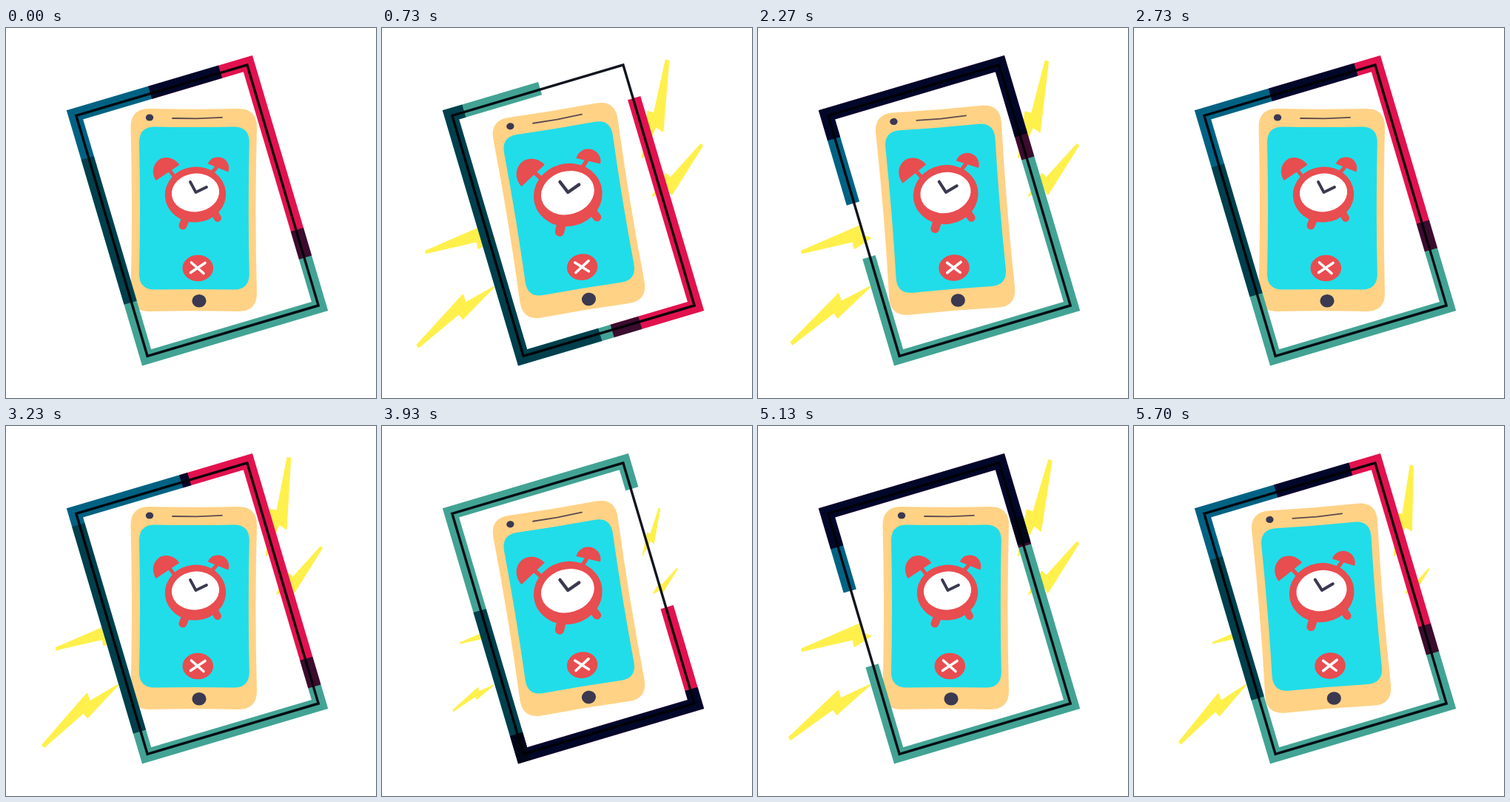
These frames come from a looping animation (500x500 px, 5.73 s). An HTML page with a canvas:

```html
<!DOCTYPE html>
<html lang="en">
<head>
<meta charset="utf-8">
<title>Ringing phone</title>
<style>
  html, body { margin: 0; width: 100%; height: 100%; overflow: hidden; background: #fff; }
  canvas { display: block; width: 500px; height: 500px; }
</style>
</head>
<body>
<canvas id="stage" width="500" height="500"></canvas>
<script>
const LOOP = 5730;
const LAP = 2895;            // one turn of the border colours
const STEP = 67;             // hold of each hand-drawn pose
const POSES = 20;
const RAD = Math.PI / 180;

const RED = '#e2124f', GREEN = '#42a394', BLUE = '#006283';
const CORAL = '#e84d50', INK = '#3b3950', YELLOW = '#fff04c';

const ctx = document.getElementById('stage').getContext('2d');
const layer = document.createElement('canvas');
layer.width = layer.height = 500;
const ring = layer.getContext('2d');

// ---- border: three strips that multiply where they overlap ----
const TURN = 1160;           // border units per lap
const BAND_W = 244, BAND_H = 342;
const unit = 2 * (BAND_W + BAND_H) / TURN;

function strip(color, start, length) {
  const from = ((start % TURN) + TURN) % TURN;
  ring.beginPath();
  // two laps, so strips stay joined across the first corner
  for (let i = 0; i <= 8; i++) {
    const right = i % 4 === 1 || i % 4 === 2, low = i % 4 > 1;
    ring.lineTo(right ? BAND_W / 2 : -BAND_W / 2, low ? BAND_H / 2 : -BAND_H / 2);
  }
  ring.setLineDash([length * unit, 3 * TURN * unit]);
  ring.lineDashOffset = -from * unit;
  ring.strokeStyle = color;
  ring.lineWidth = 18;
  ring.stroke();
}

function drawBorder(t) {
  const x = (t / LAP) % 1;
  const head = 105 + TURN * x * x * (3 - 2 * x);
  ring.clearRect(0, 0, 500, 500);
  ring.save();
  ring.globalCompositeOperation = 'multiply';
  ring.translate(258.5, 246.7);
  ring.rotate(-16.5 * RAD);
  strip(RED, head, 407);
  strip(GREEN, head + 368, 627);
  strip(BLUE, 1003 - head, 465);
  ring.setLineDash([]);
  ring.strokeStyle = '#10141e';
  ring.lineWidth = 3.4;
  ring.strokeRect(-120.5, -169.5, 241, 339);
  ring.restore();
  ctx.drawImage(layer, 0, 0);
}

// ---- lightning ----
const BOLTS = [
  { base: [352, 175], tip: [386, 42], wide: 1, peak: 0.3, delay: 0, turn: 0.012 },
  { base: [151, 350], tip: [47, 431], wide: 1, peak: 0.3, delay: 0, turn: 0.012 },
  { base: [366, 227], tip: [433, 157], wide: 1.35, peak: 0.2, delay: 3, turn: 0 },
  { base: [152, 284], tip: [58, 303], wide: 1.55, peak: 0.1, delay: 3, turn: 0 }
];

function drawBolt({ base, tip, wide, peak, delay, turn }, pose) {
  const grow = Math.min(1, Math.max(0, (pose - delay) / 7.5));
  const reach = (1 - (1 - grow) ** 2.2) * Math.min(1, (POSES - pose) / 4);
  if (reach <= 0) return;
  const zigzag = [
    [0, 0], [peak + 0.03, 0.05 * wide], [peak, 0.13 * wide],
    [0.985, 0.014], [0.985, -0.014], [peak + 0.15, 0.004], [peak + 0.15, -0.062 * wide]
  ];
  const dx = tip[0] - base[0], dy = tip[1] - base[1];
  ctx.save();
  ctx.translate(...base);
  ctx.rotate(turn * (pose - 10));
  ctx.scale(reach, reach);
  ctx.beginPath();
  zigzag.forEach(([a, n]) => ctx.lineTo(dx * a - dy * n, dy * a + dx * n));
  ctx.closePath();
  ctx.fillStyle = ctx.strokeStyle = YELLOW;
  ctx.lineWidth = 2;
  ctx.lineJoin = 'round';
  ctx.fill();
  ctx.stroke();
  ctx.restore();
}

// ---- phone ----
// rounded box whose sides bend inwards a little
function softBox(color, l, t, r, b, round, bend) {
  const cx = (l + r) / 2, cy = (t + b) / 2;
  ctx.beginPath();
  ctx.moveTo(l + round, t);
  ctx.quadraticCurveTo(cx, t + bend, r - round, t);
  ctx.quadraticCurveTo(r, t, r, t + round);
  ctx.quadraticCurveTo(r - 2 * bend, cy, r, b - round);
  ctx.quadraticCurveTo(r, b, r - round, b);
  ctx.quadraticCurveTo(cx, b - bend, l + round, b);
  ctx.quadraticCurveTo(l, b, l, b - round);
  ctx.quadraticCurveTo(l + 2 * bend, cy, l, t + round);
  ctx.quadraticCurveTo(l, t, l + round, t);
  ctx.fillStyle = color;
  ctx.fill();
}

function oval(color, x, y, rx, ry, tilt = 0, from = 0) {
  ctx.beginPath();
  ctx.ellipse(x, y, rx, ry, tilt * RAD, from, Math.PI * 2);
  ctx.fillStyle = color;
  ctx.fill();
}

const dome = (x, y, rx, ry, tilt) => oval(CORAL, x, y, rx, ry, tilt, Math.PI);

function stroke(color, width, ...pts) {
  ctx.beginPath();
  pts.forEach(p => ctx.lineTo(...p));
  ctx.strokeStyle = color;
  ctx.lineWidth = width;
  ctx.lineCap = ctx.lineJoin = 'round';
  ctx.stroke();
}

function drawClock() {
  stroke(CORAL, 5, [220, 191], [230, 204]);
  stroke(CORAL, 5, [284, 189], [275, 199]);
  dome(218.5, 195.5, 19, 21, -34);
  dome(286.5, 189, 14.8, 14.5, 22);
  stroke(CORAL, 11, [243, 257], [239, 267]);
  stroke(CORAL, 10, [281, 248], [286, 257]);
  oval(CORAL, 256, 225, 41.3, 37.5, -5);
  oval('#fff', 256, 222.5, 32.2, 25.8, -6);
  stroke(INK, 3.8, [249, 208], [256.5, 222], [271, 215]);
}

function drawPhone(pose) {
  const lean = [0, 0.5, 1, 0.5][pose % 4];
  ctx.save();
  ctx.translate(256, 254);
  ctx.rotate(-lean * 9.3 * RAD);
  ctx.translate(-256, -254);

  softBox('#ffd286', 168.5, 109, 339, 383, 25, 1.5);
  softBox('#21dde9', 180, 133.5, 328.8, 353.5, 21, 1);
  oval(INK, 194, 121, 5.2, 4.6);
  stroke('#5d4a50', 1.8, [225, 122], [258, 122.3], [292, 120.8]);
  oval(INK, 261, 368.8, 9.6, 8.8);

  oval(CORAL, 259.3, 324.5, 20.8, 17.8);
  stroke('#fff', 3.6, [250.5, 317], [267, 331.5]);
  stroke('#fff', 3.6, [269, 317.5], [249.5, 330.5]);

  const grow = 1 + 0.13 * lean;
  ctx.translate(256, 224);
  ctx.scale(grow, grow);
  ctx.translate(-256, -224);
  drawClock();
  ctx.restore();
}

function draw(t) {
  const pose = Math.floor(t / STEP) % POSES;
  ctx.fillStyle = '#fff';
  ctx.fillRect(0, 0, 500, 500);
  BOLTS.forEach(bolt => drawBolt(bolt, pose));
  drawPhone(pose);
  drawBorder(t);
}

const begin = performance.now();
function tick() {
  draw((performance.now() - begin) % LOOP);
  requestAnimationFrame(tick);
}
tick();
</script>
</body>
</html>
```
